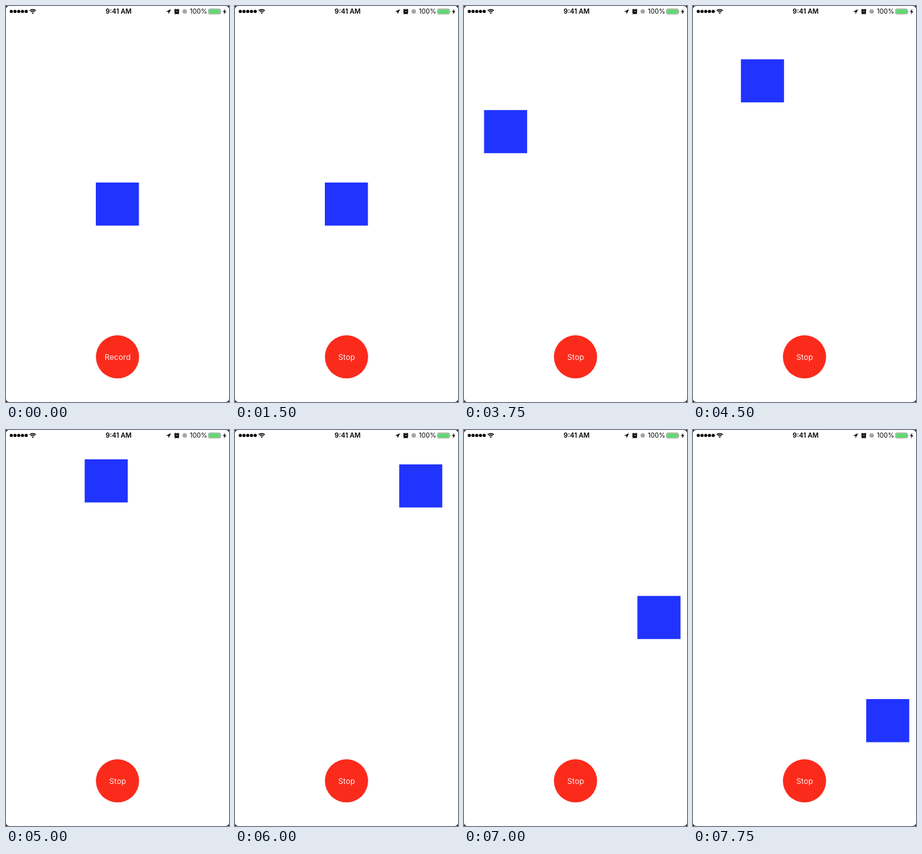
An HTML page for the animation above (8000 ms loop, 350 by 621 pixels).

```html
<!DOCTYPE html>
<html lang="en">
<head>
<meta charset="utf-8">
<style>
  html, body { margin: 0; width: 100%; height: 100%; overflow: hidden; background: #fff; }
  svg { display: block; width: 350px; height: 621px; }
  text { font-family: Inter, "Liberation Sans", sans-serif; text-anchor: middle; }
</style>
</head>
<body>
<svg viewBox="0 0 350 621">
  <rect width="350" height="621" fill="#231c1c"/>
  <rect width="350" height="621" rx="5" fill="#fff"/>

  <!-- status bar -->
  <path d="M8.3 8.6h24" stroke="#000" stroke-width="5" stroke-linecap="round" stroke-dasharray="0 5.85"/>
  <g fill="none" stroke="#000" stroke-width="1.5">
    <path d="M37.3 7.4a6.6 6.6 0 0 1 9.4 0M39.1 9.3a4 4 0 0 1 5.8 0"/>
  </g>
  <path d="M40.4 10.7a2.3 2.3 0 0 1 3.2 0L42 12.4z"/>
  <text x="176.7" y="12.4" font-size="10.4" font-weight="600">9:41 AM</text>
  <path d="M251.3 8.9L259 5l-3.8 7.7-.4-3.8z"/>
  <circle cx="268" cy="8.9" r="3.7"/>
  <path d="M264.4 6.5l2-1.7M269.6 4.8l2 1.7M265.6 11.6l-.8 1M270.4 11.6l.8 1" stroke="#000" stroke-width="1.5"/>
  <path d="M266.2 7.4l1.8 1.7 2-.7" fill="none" stroke="#fff" stroke-width=".8"/>
  <circle cx="280.5" cy="8.6" r="3.5" fill="#a5a5a5"/>
  <text x="302.2" y="12.4" font-size="10.3">100%</text>
  <rect x="317.7" y="4.6" width="18.9" height="8.2" rx="1.6" fill="#fff" stroke="#777" stroke-width=".7"/>
  <rect x="318.4" y="5.3" width="17.5" height="6.8" rx="1" fill="#62d675"/>
  <path d="M337.4 7.2q1.5 1.5 0 3z" fill="#666"/>
  <path d="M344.4 4.4l-4 4.9h2.4l-1 3.9 4-5h-2.5z"/>

  <circle cx="175" cy="550.2" r="33.9" fill="#fb2b1c"/>
  <text id="label" x="175.2" y="554.6" font-size="12.2" fill="#ffeae8">Record</text>
  <rect id="box" width="67.6" height="67.6" fill="#2033ff"/>
</svg>
<script>
const LOOP = 8000, STEP = 250, RECORD_AT = 1250;
const box = document.getElementById('box');
const label = document.getElementById('label');

// time, x, y of the dragged square
const path = [
  [0, 141, 276.8], [2000, 141, 276.8], [2750, 82, 279.3], [3750, 31.5, 163.2],
  [5000, 123.5, 46], [6000, 257.7, 53.9], [7000, 272.2, 260.2], [7750, 271.8, 422]
];

function slope(i, axis) {
  if (i < 2) return 0;
  const a = path[i - 1], b = path[Math.min(i + 1, path.length - 1)];
  return (b[axis] - a[axis]) / (b[0] - a[0]);
}

// cubic Hermite through the path points
function position(t, axis) {
  let i = 0;
  while (i < path.length - 2 && t >= path[i + 1][0]) i++;
  const a = path[i], b = path[i + 1], span = b[0] - a[0];
  const u = Math.min(1, (t - a[0]) / span), v = 1 - u;
  return v * v * (1 + 2 * u) * a[axis] + u * u * (3 - 2 * u) * b[axis]
    + u * v * span * (v * slope(i, axis) - u * slope(i + 1, axis));
}

function draw() {
  const t = Math.floor(performance.now() % LOOP / STEP) * STEP;
  box.setAttribute('x', position(t, 1));
  box.setAttribute('y', position(t, 2));
  label.textContent = t < RECORD_AT ? 'Record' : 'Stop';
  requestAnimationFrame(draw);
}
draw();
</script>
</body>
</html>
```
